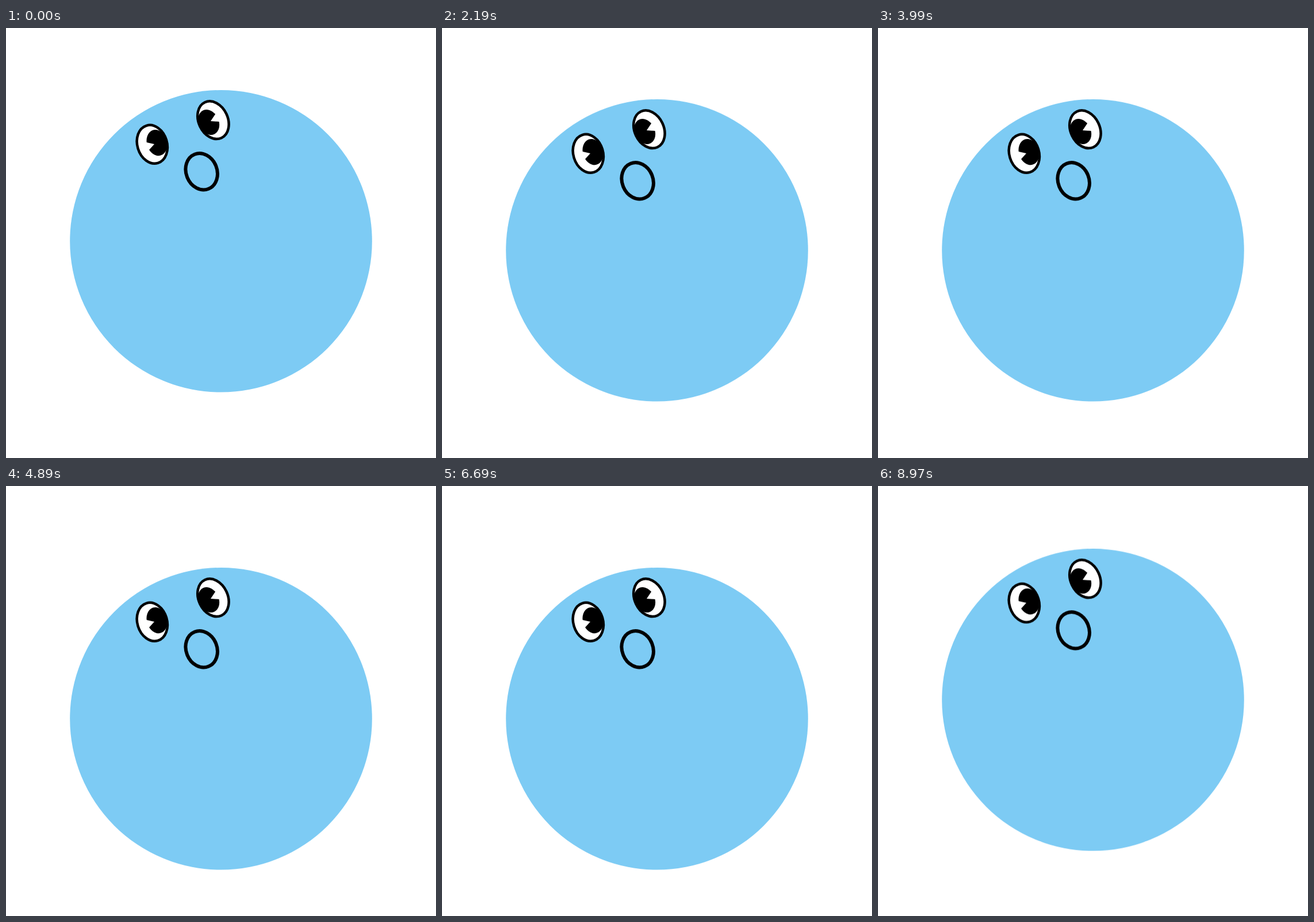
These frames come from a looping animation (748 px wide and 748 px high, 9000 ms). An HTML page:

```html
<!DOCTYPE html>
<html lang="en">
<head>
<meta charset="utf-8">
<title>Bobbing ball</title>
<style>
  html, body { margin: 0; width: 100%; height: 100%; overflow: hidden; background: #fff; }
  svg { display: block; width: 100%; height: 100%; }
  .ball { animation: bob 1.8s infinite; }
  .skin { fill: #7dcbf4; }
  .white { fill: #fff; }
  .rim { fill: none; stroke: #000; stroke-width: 4.5; }
  .mouth { fill: none; stroke: #000; stroke-width: 6; }

  /* slow start going down, brisk arrival at the top */
  @keyframes bob {
    0% { transform: translateY(0); animation-timing-function: cubic-bezier(.52, 0, .66, 1); }
    50% { transform: translateY(56px); animation-timing-function: cubic-bezier(.27, 0, .56, .72); }
    100% { transform: translateY(0); }
  }
</style>
</head>
<body>
<svg viewBox="0 0 748 748">
  <g class="ball">
    <circle class="skin" cx="374" cy="370.8" r="262.8"/>

    <g id="left-eye">
      <ellipse class="white" rx="25.8" ry="34" transform="translate(254.3 202.3) rotate(-17)"/>
      <ellipse rx="17.5" ry="23" transform="translate(262.5 199.6) rotate(-17)"/>
      <path class="white" d="M258 202L238 197.4L244 217.5Z"/>
      <ellipse class="rim" rx="25.8" ry="34" transform="translate(254.3 202.3) rotate(-17)"/>
    </g>

    <g id="right-eye">
      <ellipse class="white" rx="25.4" ry="34.2" transform="translate(360.4 160.2) rotate(-25)"/>
      <ellipse rx="17.5" ry="22.8" transform="translate(352.6 164) rotate(-25)"/>
      <path class="white" d="M356 162L368 144L378 163.5Z"/>
      <ellipse class="rim" rx="25.4" ry="34.2" transform="translate(360.4 160.2) rotate(-25)"/>
    </g>

    <ellipse class="mouth" rx="26.9" ry="32.4" transform="translate(340.2 249.7) rotate(-22)"/>
  </g>
</svg>
</body>
</html>
```
